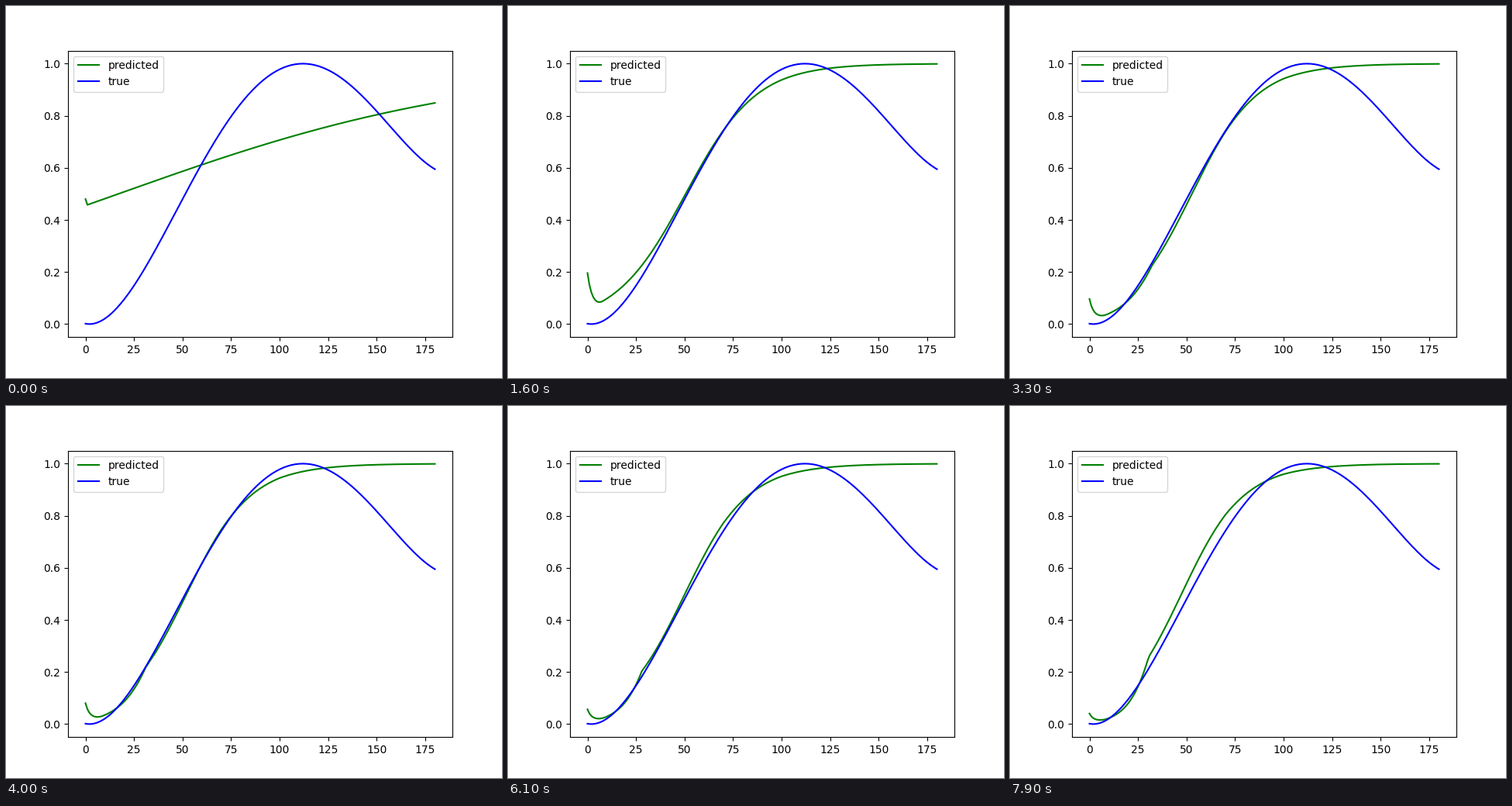
These frames come from a looping animation (640 by 480 pixels, 8 s). A matplotlib script:

```python
import numpy as np
import matplotlib.pyplot as plt
from matplotlib.animation import FuncAnimation

FRAMES, INTERVAL = 80, 100
x = np.arange(181)

# Target: a hump peaking at 1 for x = 112, with a minimum of 0 near x = 2
u = x / 100
truth = 1 - (u - 1.12) ** 2 * np.polyval([-.058, .1497, -.9123, 1.54, .796], u)


def approach(t, start, end, tau):
    return end + (start - end) * np.exp(-t / tau)


def predict(t):
    """Sigmoid of a bent line plus a short bump at the left, t in seconds."""
    # The line steepens with training; past each bend its slope is capped
    steep = approach(t, .0106, .1556, 4.4)
    caps = [1, .0585 + .0005 * t, .0585, .053]
    bend = 30.3 + 2.3 * np.cos(2 * np.pi * (t - 2.7) / 6.8)
    knots = np.array([0, bend, 70, 100, 180])
    heights = np.append(0, np.cumsum(np.minimum(steep, caps) * np.diff(knots)))
    line = np.interp(x, knots, heights)

    # Level of the line at x = 50
    level = np.interp(t, [0, .9, 2.2, 3.3, 6.1, 7.9],
                      [.35, .122, -.16, -.165, -.012, .16])

    # Bump that keeps the left end from dropping
    height = .1 + 1.8 * np.tanh(t / 1.85)
    width = approach(t, 1, 9.3, .75)
    bump = height * np.maximum(0, 1 - x / width) ** 2.5

    return 1 / (1 + np.exp(-(level + line - line[50] + bump)))


fig, ax = plt.subplots(figsize=(6.4, 4.8), dpi=100)
pred_line, = ax.plot(x, predict(0), color="green", label="predicted")
ax.plot(x, truth, color="blue", label="true")
ax.set_xlim(-9, 189)
ax.set_ylim(-.05, 1.05)
ax.legend(loc="upper left")


def update(frame):
    pred_line.set_ydata(predict(frame * INTERVAL / 1000))
    return pred_line,


anim = FuncAnimation(fig, update, frames=FRAMES, interval=INTERVAL,
                     repeat=True, repeat_delay=0)
plt.show()
```
